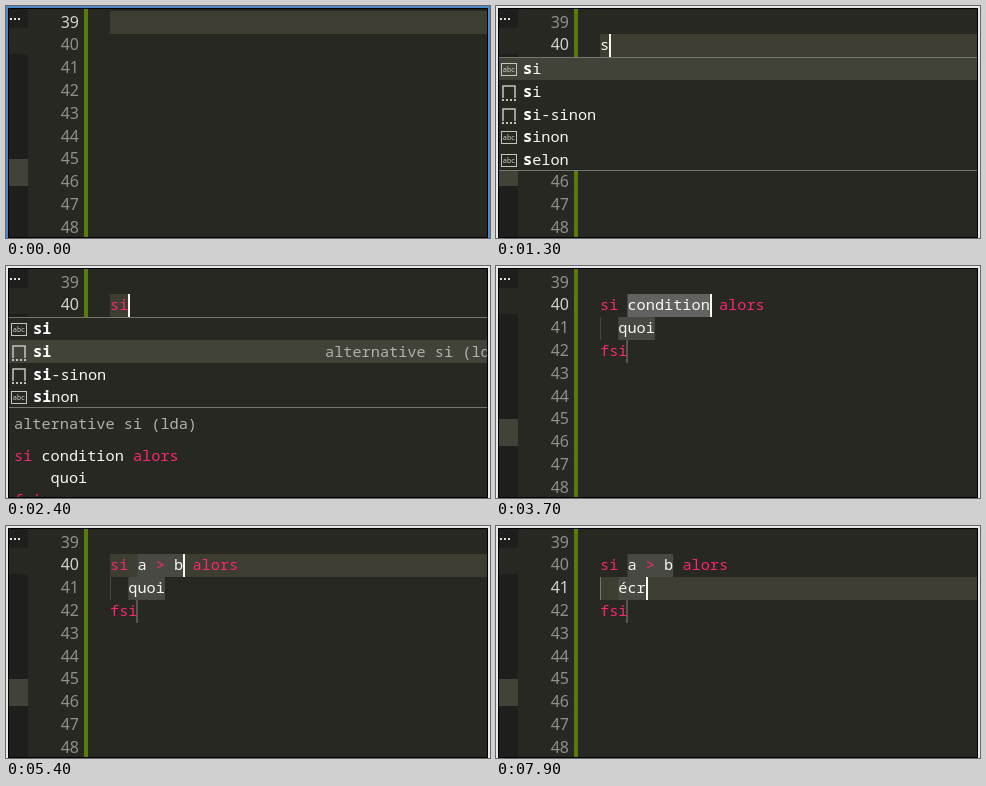
These frames come from a looping animation (484x232 px, 8000 ms). An HTML page:

```html
<!DOCTYPE html>
<html lang="fr">
<head>
<meta charset="utf-8">
<title>Snippet completion</title>
<style>
  html, body { margin: 0; width: 100%; height: 100%; overflow: hidden; background: #000; }
  svg { display: block; }
  text { font: 15.25px "Noto Sans Mono", "DejaVu Sans Mono", monospace; white-space: pre; fill: #f8f8f2; }
  .num { font: 16px "Noto Sans", "Open Sans", sans-serif; text-anchor: end; fill: #90908a; }
  .active { fill: #d2d2cd; }
  .key { fill: #f92672; }
  .match { font-weight: 700; fill: #fff; }
  .muted { fill: #b1b1ab; }
  .tiny { font-size: 7px; text-anchor: middle; fill: #d0d0ca; }
</style>
</head>
<body>
<svg id="stage" width="484" height="232" viewBox="0 0 484 232"></svg>
<script>
const stage = document.getElementById('stage');
const LOOP = 8000, CHAR = 9.15, LEFT = 104, RIGHT = 481, PITCH = 22.8;
const rowTop = n => Math.round(5.3 + (n - 39) * PITCH);
const colX = c => LEFT + c * CHAR;

const rect = (x, y, w, h, fill) =>
  `<rect x="${x}" y="${y}" width="${w}" height="${h}" fill="${fill}"/>`;
const escape = s => s.replace(/>/g, '&gt;');
const label = (x, y, body, cls = '') => `<text x="${x}" y="${y}" class="${cls}">${body}</text>`;
const colored = s => s.split(/(\bsi\b|\balors\b|\bfsi\b|>)/)
  .map((part, i) => i % 2 ? `<tspan class="key">${escape(part)}</tspan>` : part).join('');

// Each step changes part of the editor state; the rest carries over.
const start = { focus: true, line: 39, col: 0, cursor: false, lit: true, code: '', popup: null,
                snippet: false, cond: '', body: 'quoi', picking: false };
const list = (count, typed, selected, docs) => ({ count, typed, selected, docs });
const steps = [
  [700, { focus: false, line: 40, cursor: true }],
  [1200, { cursor: false }],
  [1300, { code: 's', col: 1, cursor: true, popup: list(5, 1, 0, false) }],
  [1500, { code: 'si', col: 2, popup: list(4, 2, 0, false) }],
  [1900, { cursor: false }],
  [2300, { cursor: true }],
  [2400, { popup: list(4, 2, 1, true), lit: false }],
  [2800, { popup: null, snippet: true, cond: 'condition', picking: true, col: 12 }],
  [3200, { cursor: false }],
  [3700, { cursor: true }],
  [3900, { cond: 'a', col: 4, picking: false, lit: true }],
  [4000, { cond: 'a ', col: 5 }],
  [4500, { cursor: false }],
  [4600, { cond: 'a >', col: 6, cursor: true }],
  [5000, { cursor: false }],
  [5200, { cond: 'a > ', col: 7, cursor: true }],
  [5400, { cond: 'a > b', col: 8 }],
  [5900, { line: 41, col: 6, picking: true, lit: false }],
  [6400, { cursor: false }],
  [6800, { cursor: true }],
  [7300, { body: 'é', col: 3, picking: false, lit: true }],
  [7600, { body: 'éc', col: 4 }],
  [7900, { body: 'écr', col: 5 }]
];
const items = [['si', 'abc'], ['si', 'snippet'], ['si-sinon', 'snippet'], ['sinon', 'abc'], ['selon', 'abc']];

function codeLine(n, col, text) {
  return label(colX(col), rowTop(n) + 16.3, colored(text));
}

function field(n, col, text, selected) {
  return rect(colX(col), rowTop(n), text.length * CHAR, 23, selected ? '#626360' : '#484943');
}

function snippet(s) {
  const guide = s.line === 41 ? '#767771' : '#464741';
  return field(40, 3, s.cond, s.picking && s.line === 40)
    + field(41, 2, s.body, s.picking && s.line === 41)
    + rect(LEFT, rowTop(41), 1, 23, guide)
    + rect(130, rowTop(42), 2, 23, '#555650')
    + codeLine(40, 0, `si ${s.cond} alors`)
    + codeLine(41, 2, s.body)
    + codeLine(42, 0, 'fsi');
}

function icon(kind, y) {
  if (kind === 'abc')
    return `<rect x="5.5" y="${y + 6.5}" width="15" height="12" fill="none" stroke="#c5c5c0"/>`
      + label(13, y + 15, 'abc', 'tiny');
  return `<path d="M7 ${y + 18}V${y + 6}H19V${y + 18}" fill="none" stroke="#c5c5c0" stroke-width="1.5"/>`
    + `<path d="M6 ${y + 20}H20" stroke="#c5c5c0" stroke-width="2" stroke-dasharray="2 2"/>`;
}

function popup({ count, typed, selected, docs }) {
  const top = 51, bottom = Math.round(top + count * PITCH);
  let out = rect(3, top, 478, (docs ? 231 : bottom) - top, '#272822');
  items.slice(0, count).forEach(([name, kind], i) => {
    const y = Math.round(top + i * PITCH);
    if (i === selected) out += rect(3, y, 478, 23, '#414339');
    out += icon(kind, y) + label(27, y + 17,
      `<tspan class="match">${name.slice(0, typed)}</tspan>${name.slice(typed)}`);
  });
  out += rect(3, top, 478, 1, '#75766f') + rect(3, bottom - 1, 478, 1, '#75766f');
  if (docs) {
    const title = 'alternative si (lda)';
    out += label(319, 91, title, 'muted') + label(8, 163, title, 'muted');
    ['si condition alors', '    quoi', 'fsi'].forEach((line, i) => {
      out += label(8, 195 + i * 22, colored(line));
    });
  }
  return out;
}

function draw(s) {
  let out = rect(0, 0, 484, 232, s.focus ? '#4d88c7' : '#e8e8e8')
    + rect(2, 2, 480, 230, '#000')
    + '<clipPath id="view"><rect x="3" y="3" width="478" height="228"/></clipPath><g clip-path="url(#view)">'
    + rect(3, 3, 478, 228, '#272822') + rect(3, 3, 19, 228, '#1e1f1c')
    + rect(3, 22, 19, 26, '#272822') + rect(3, 153, 19, 27, '#414339');
  for (let i = 0; i < 3; i++) out += rect(4 + i * 4, 12, 2, 2, '#e0e0dc');
  out += rect(78, 3, 4, 228, '#587c0c');
  if (s.lit && !s.picking) out += rect(LEFT, rowTop(s.line), RIGHT - LEFT, 23, '#3e3d32');
  else if (s.popup) out += rect(LEFT, rowTop(40), 2 * CHAR, 23, '#3e3d32');
  for (let n = 39; n <= 48; n++)
    out += label(73, 5.3 + (n - 39) * PITCH + 16.3, n, n === s.line ? 'num active' : 'num');
  out += s.snippet ? snippet(s) : codeLine(40, 0, s.code);
  if (s.cursor) out += rect(Math.round(colX(s.col)), rowTop(s.line), 2, 23, '#f8f8f0');
  if (s.popup) out += popup(s.popup);
  stage.innerHTML = out + '</g>';
}

let shown = -1;
function render(time) {
  const count = steps.filter(([at]) => at <= time).length;
  if (count === shown) return;
  shown = count;
  draw(Object.assign({}, start, ...steps.slice(0, count).map(step => step[1])));
}

const began = performance.now();
function tick() {
  render((performance.now() - began) % LOOP);
  requestAnimationFrame(tick);
}
tick();
</script>
</body>
</html>
```
